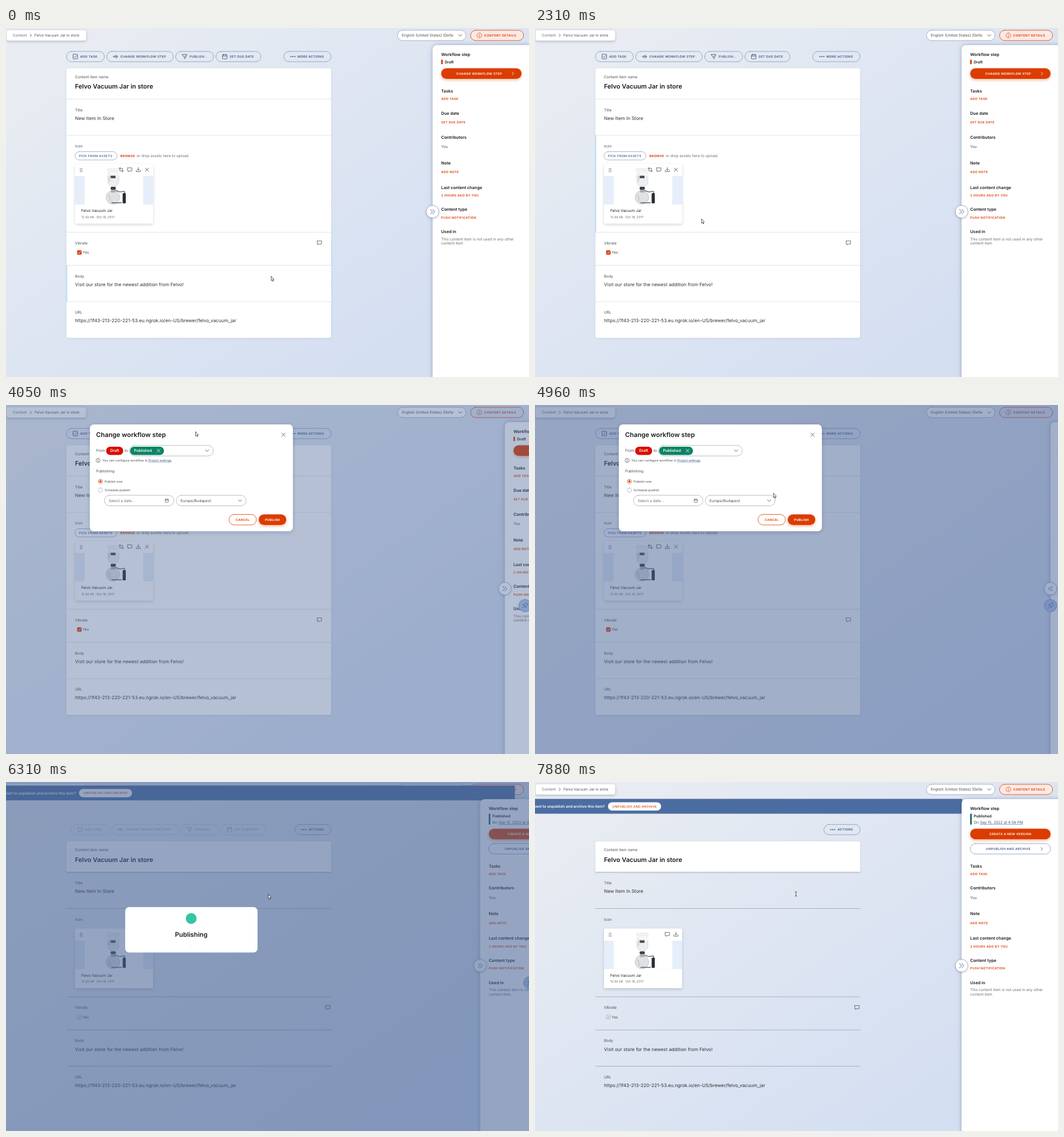
An HTML page with a canvas that plays this animation: 917 by 611 pixels, repeating every 8 s.

```html
<!DOCTYPE html>
<html lang="en">
<head>
<meta charset="utf-8">
<title>Publishing a content item</title>
<style>
html, body { margin: 0; width: 100%; height: 100%; overflow: hidden; background: #dfe7f2; }
canvas { display: block; width: 917px; height: 611px; }
</style>
</head>
<body>
<canvas id="stage"></canvas>
<script>
const W = 917, H = 611, LOOP = 8000;
const INK = '#1a1a1a', GREY = '#4c4c4c', SOFT = '#6c6c6c', ORANGE = '#db3c00', WHITE = '#fff';
const BLUE = '#3f5684', EDGE = '#8093b5';
const ITEM = 'Felvo Vacuum Jar';
const cv = document.getElementById('stage');
const c = cv.getContext('2d');
const dpr = window.devicePixelRatio || 1;
cv.width = W * dpr;
cv.height = H * dpr;

// Value on a keyed track: each key is [time, ...values].
function track(t, keys, ease = p => p * p * (3 - 2 * p)) {
  if (t <= keys[0][0]) return keys[0].slice(1);
  for (let i = 1; i < keys.length; i++) {
    const a = keys[i - 1], b = keys[i];
    if (t < b[0]) {
      const p = ease((t - a[0]) / (b[0] - a[0]));
      return a.slice(1).map((v, k) => v + (b[k + 1] - v) * p);
    }
  }
  return keys[keys.length - 1].slice(1);
}
const linear = p => p;

function text(s, x, y, { size = 6.55, color = INK, weight = 400, gap = 0, align = 'left' } = {}) {
  c.font = `${weight} ${size}px Inter, sans-serif`;
  c.letterSpacing = gap + 'px';
  c.textAlign = align;
  c.fillStyle = color;
  c.fillText(s, x, y + size * 0.364);
}
const label = (s, x, y, color = GREY) => text(s, x, y, { color });
const caps = (s, x, y, color = BLUE, align = 'left', weight = 600) =>
  text(s, x, y, { size: 5.5, weight, gap: 0.33, color, align });
const head = (s, x, y) => text(s, x, y, { size: 7.3, weight: 600 });

function shadow(color, blur, dy = 0) {
  c.shadowColor = color;
  c.shadowBlur = blur * dpr;
  c.shadowOffsetY = dy * dpr;
}
const noShadow = () => shadow('transparent', 0);

function box(x, y, w, h, r, fill, stroke, width = 0.7) {
  c.beginPath();
  c.roundRect(x, y, w, h, r);
  if (fill) { c.fillStyle = fill; c.fill(); }
  noShadow();
  if (stroke) { c.strokeStyle = stroke; c.lineWidth = width; c.stroke(); }
}
function disc(x, y, r, fill, stroke, width = 0.7) {
  box(x - r, y - r, 2 * r, 2 * r, r, fill, stroke, width);
}
function path(pts, stroke, width = 0.8, fill) {
  c.beginPath();
  for (let i = 0; i < pts.length; i += 2) c.lineTo(pts[i], pts[i + 1]);
  if (fill) { c.closePath(); c.fillStyle = fill; c.fill(); }
  if (stroke) { c.strokeStyle = stroke; c.lineWidth = width; c.stroke(); }
}
const at = (x, y, draw) => { c.save(); c.translate(x, y); draw(); c.restore(); };

const icon = {
  check(x, y, col = BLUE) {
    at(x, y, () => { box(-4, -4, 8, 8, 1, null, col, 0.9); path([-2, 0, -0.5, 1.6, 2.6, -2], col, 0.9); });
  },
  step(x, y) {
    at(x, y, () => {
      path([-4.5, 0, 3.8, 0], BLUE, 0.9);
      path([1.2, -2.6, 4, 0, 1.2, 2.6], BLUE, 0.9);
      disc(-0.8, 0, 1.5, '#dfe7f2', BLUE, 0.9);
    });
  },
  funnel(x, y) {
    at(x, y, () => {
      path([-4.3, -3.6, 4.3, -3.6, 0.6, 4, -0.9, 0.7, -4.3, -3.6], BLUE, 0.9);
      path([-0.9, 0.7, 2, -1.6], BLUE, 0.8);
    });
  },
  calendar(x, y, k = 1, col = BLUE) {
    at(x, y, () => {
      c.scale(k, k);
      box(-4, -3.4, 8, 7.4, 1, null, col, 0.9);
      path([-4, -0.9, 4, -0.9], col, 0.9);
      path([-2, -4.4, -2, -2.6], col, 0.9);
      path([2, -4.4, 2, -2.6], col, 0.9);
    });
  },
  dots(x, y) { for (let i = -1; i < 2; i++) disc(x + i * 3.4, y, 1.1, BLUE); },
  comment(x, y) {
    path([x - 3.8, y - 3.2, x + 3.8, y - 3.2, x + 3.8, y + 2.2, x - 0.4, y + 2.2, x - 2, y + 3.8,
      x - 2, y + 2.2, x - 3.8, y + 2.2, x - 3.8, y - 3.2], GREY);
  },
  crop(x, y) {
    path([x - 2.2, y - 4, x - 2.2, y + 2.2, x + 4, y + 2.2], GREY);
    path([x - 4, y - 2.2, x + 2.2, y - 2.2, x + 2.2, y + 4], GREY);
  },
  download(x, y) {
    path([x, y - 4, x, y + 1.2], GREY);
    path([x - 2, y - 0.8, x, y + 1.3, x + 2, y - 0.8], GREY);
    path([x - 3.6, y + 1, x - 3.6, y + 3.4, x + 3.6, y + 3.4, x + 3.6, y + 1], GREY);
  },
  cross(x, y, r = 3, col = GREY) {
    path([x - r, y - r, x + r, y + r], col);
    path([x + r, y - r, x - r, y + r], col);
  },
  right(x, y, col = GREY, r = 2.4) { path([x - r / 2, y - r, x + r / 2, y, x - r / 2, y + r], col, 0.9); },
  down(x, y) { path([x - 2.8, y - 1.3, x, y + 1.4, x + 2.8, y - 1.3], GREY, 0.9); },
  info(x, y, r, col) {
    disc(x, y, r, null, col);
    path([x, y - 0.5, x, y + r * 0.55], col, 0.8);
    disc(x, y - r * 0.45, 0.5, col);
  }
};

function background() {
  const g = c.createLinearGradient(170, 0, 600, 611);
  g.addColorStop(0, '#e8ecf2');
  g.addColorStop(1, '#d4dff2');
  c.fillStyle = g;
  c.fillRect(0, 0, W, H);
}

function topBar(detailsOpen) {
  shadow('rgba(40,50,80,.3)', 5, 1.5);
  box(1, 4, 139.5, 18, 4, WHITE);
  label('Content', 12, 13, SOFT);
  icon.right(43.5, 13, GREY, 2.2);
  text(ITEM + ' in store', 50, 13, { size: 6.45, color: GREY });
  box(686.5, 4, 120, 18, 9, WHITE, '#8e99ad');
  c.save();
  c.beginPath();
  c.rect(690, 4, 94.5, 18);
  c.clip();
  label('English (United States) (Default)', 694, 13);
  c.restore();
  icon.down(796.5, 13);
  box(814.5, 4, 93, 18, 9, detailsOpen && '#fbe9e3', ORANGE, 0.8);
  icon.info(830, 13, 4.2, ORANGE);
  caps('CONTENT DETAILS', 838.5, 13, ORANGE);
}

function tool(x, w, y, s, tx, draw, ix, fill) {
  box(x, y - 9, w, 18, 9, fill, EDGE, 0.8);
  draw(ix, y);
  caps(s, tx, y);
}
function mainTools(dx, y, hover) {
  at(dx, 0, () => {
    tool(106, 66.5, y, 'ADD TASK', 130, icon.check, 121.5);
    tool(176.5, 117, y, 'CHANGE WORKFLOW STEP', 200.5, icon.step, 192);
    tool(297.5, 66.5, y, 'PUBLISH…', 322, icon.funnel, 313, hover && '#b0c5ec');
    tool(368, 79, y, 'SET DUE DATE', 392, icon.calendar, 383.5);
  });
}

// Soft flat silhouette of a glass brewer; x is its left edge, y the top of the picture.
function brewer(x, y) {
  at(x, y, () => {
    box(1, 0, 23, 6, 2.5, '#e2e4e6');
    box(3, 6, 19.5, 26, [2, 2, 8, 8], '#eceef0', '#c6cacf', 0.6);
    box(4.5, 8, 3, 16, 1.5, '#d6d9dd');
    box(8, 13, 8.5, 5, 1, '#45484c');
    box(8, 33, 9, 5, 1.5, '#3c3e42');
    disc(12, 51.5, 12, '#dfe2e5', '#b7bcc1', 0.7);
    box(8.5, 38, 8, 5, 1, '#a9aeb3');
    path([17, 39.5, 24, 42, 32, 41, 33, 44], '#6a6d72', 1.5);
    box(29, 44, 5.5, 18, 1.5, '#2a2c30');
    path([5, 48, 8, 58], '#c8cdd2', 2);
    path([10, 61, 27, 61], '#5c5f64', 1.5);
  });
}

function asset(y, live) {
  shadow('rgba(40,50,80,.2)', 5, 2);
  box(121, y, 137, 104.5, 3, WHITE);
  c.fillStyle = '#e6eef9';
  c.fillRect(121, y + 21, 137, 50);
  c.fillStyle = WHITE;
  c.fillRect(138, y + 20, 102.5, 51);
  c.save();
  c.beginPath();
  c.rect(138, y, 103, 71);
  c.clip();
  brewer(175.5, y + 7);
  c.restore();
  c.fillStyle = 'rgba(255,255,255,.55)';
  c.fillRect(121, y + 4, 137, 17);
  for (let i = 0; i < 6; i++) disc(130.4 + (i % 2) * 2.6, y + 8.2 + (i >> 1) * 2.6, 0.75, GREY);
  if (live) {
    icon.comment(232, y + 10);
    icon.download(247, y + 10);
  } else {
    icon.crop(202, y + 10);
    icon.comment(217, y + 10);
    icon.download(232, y + 10);
    icon.cross(247, y + 10);
  }
  text(ITEM, 132, y + 82, { size: 6.5 });
  text('12.92 kB · Oct 18, 2017', 132, y + 92.8, { size: 5.5, color: SOFT });
}

function form(live, cursorY) {
  const a = live ? 33.5 : 0, b = live ? 18.6 : 0;
  const edges = [71, 124.5 + a, 188 + a, 357.5 + b, 415.5 + b, 479 + b, 542];
  shadow('rgba(60,80,120,.12)', 4, 1);
  if (live) box(106, 104, 464, 53.5, [4, 4, 0, 0], WHITE);
  else box(106, 70.5, 464, 472, 4, WHITE);
  for (const y of edges.slice(1, -1)) path([106, y, 570, y], live ? '#a3abb8' : '#dadde3', live ? 0.9 : 0.8);
  if (cursorY) {
    const i = edges.findIndex((y, k) => cursorY >= y && cursorY < edges[k + 1]);
    if (i >= 0) {
      c.fillStyle = '#aadcf5';
      c.fillRect(106, edges[i], 1.3, edges[i + 1] - edges[i]);
    }
  }
  const body = { size: 8.2, color: '#303030' };
  label('Content item name', 121, 85.5 + a);
  text(ITEM + ' in store', 121, 102 + a, { size: 11, weight: 600 });
  label('Title', 121, 143.5 + a);
  text('New Item In Store', 121, 158 + a, body);
  label('Icon', 121, 207 + a);
  if (!live) {
    box(121, 216.5, 73.5, 14.5, 7.2, null, EDGE);
    caps('PICK FROM ASSETS', 128, 223.5, BLUE, 'left', 500);
    caps('BROWSE', 200.5, 223.7, ORANGE, 'left', 700);
    label('or drop assets here to upload.', 229, 223.7, SOFT);
  }
  asset(238 + b, live);
  label('Vibrate', 121, 376.3 + b);
  icon.comment(live ? 564.5 : 549.5, 376 + b);
  const y = 393 + b;
  box(125, y - 3.6, 7.2, 7.2, 1.5, live ? '#e3e7ed' : ORANGE, live ? '#a8adb5' : ORANGE);
  path([126.7, y, 128.2, y + 1.6, 130.7, y - 1.6], live ? '#8a9099' : WHITE, 0.9);
  label('Yes', 134.2, y);
  label('Body', 121, 434.5 + b);
  text('Visit our store for the newest addition from Felvo!', 121, 449 + b, body);
  label('URL', 121, 498 + b);
  text('https://1f43-213-220-221-53.eu.ngrok.io/en-US/brewer/felvo_vacuum_jar', 121, 512.5 + b, body);
}

function primary(x, y, w, h, fill = ORANGE) {
  shadow('rgba(219,60,0,.4)', 5, 2);
  box(x, y, w, h, h / 2, fill);
}

function sidebar(off, live, flipped) {
  at(off, 0, () => {
    shadow('rgba(40,60,110,.35)', 9);
    box(748, 30, 190, 600, [8, 0, 0, 0], WHITE);
    head('Workflow step', 763, 46.5);
    if (live) {
      c.fillStyle = '#17675c';
      c.fillRect(763, 55.5, 2.8, 19);
      text('Published', 769.3, 59.5, { weight: 600 });
      label('On', 769.3, 70.8);
      label('Sep 15, 2022 at 4:56 PM', 780, 70.8, BLUE);
      path([780, 74.3, 855, 74.3], BLUE, 0.6);
      primary(763, 81.7, 141, 18.5);
      caps('CREATE A NEW VERSION', 833.5, 91, WHITE, 'center');
      box(763, 107.8, 141, 18.3, 9.1, WHITE, EDGE, 0.8);
      caps('UNPUBLISH AND ARCHIVE', 829.7, 117, BLUE, 'center');
      icon.right(888.5, 117, BLUE);
    } else {
      box(763, 55.5, 2.8, 7.8, 0.6, ORANGE);
      text('Draft', 769.3, 59.5, { weight: 600 });
      primary(763, 70.5, 141, 18.5);
      caps('CHANGE WORKFLOW STEP', 829.7, 79.8, WHITE, 'center');
      icon.right(889, 79.8, WHITE);
      head('Due date', 763, 149);
      caps('SET DUE DATE', 763, 165, ORANGE);
    }
    const p = live ? 37 : 0, q = live ? -5.5 : 0;
    head('Tasks', 763, 110 + p);
    caps('ADD TASK', 763, 124 + p, ORANGE);
    head('Contributors', 763, 191.3 + q);
    label('You', 763, 208 + q);
    head('Note', 763, 236 + q);
    caps('ADD NOTE', 763, 252 + q, ORANGE);
    head('Last content change', 763, 279 + q);
    caps('2 HOURS AGO BY YOU', 763, 293 + q, ORANGE);
    head('Content type', 763, 317.7 + q);
    caps('PUSH NOTIFICATION', 763, 331.5 + q, ORANGE);
    head('Used in', 763, 356.5 + q);
    label('This content item is not used in any other', 763, 369.5 + q, SOFT);
    label('content item.', 763, 377 + q, SOFT);
    shadow('rgba(40,60,110,.3)', 4, 1);
    disc(748, 321.5, 11, WHITE, '#8e9ebd');
    const d = flipped ? -1 : 1;
    for (const k of [-2, 2]) path([748 + d * (k - 1.8), 317.5, 748 + d * (k + 1.8), 321.5, 748 + d * (k - 1.8), 325.5], BLUE, 0.9);
  });
  if (off > 0) at(904 + 0.2 * (156 - off), 351.3, () => {
    disc(0, 0, 11, '#b0c5ec', '#6f86b4');
    c.rotate(Math.PI / 4);
    path([-2, -5, 2, -5, 2, -0.8, 3.8, 1.2, -3.8, 1.2, -2, -0.8, -2, -5], BLUE, 0.8);
    path([0, 1.2, 0, 6], BLUE, 0.8);
  });
}

function banner(y, right) {
  c.fillStyle = '#4c6da1';
  c.fillRect(0, y, right, 26);
  text('Do you want to unpublish and archive this item?', 122.5, y + 13, { weight: 600, color: WHITE, align: 'right', size: 6.5 });
  box(128, y + 6, 93, 14.5, 7.2, WHITE);
  caps('UNPUBLISH AND ARCHIVE', 174.7, y + 13.1, ORANGE, 'center', 500);
}

function stepDialog(pressed) {
  shadow('rgba(20,35,80,.2)', 8, 2);
  box(147, 34, 356, 187, 7, WHITE);
  text('Change workflow step', 158, 52, { size: 11.25, weight: 600 });
  icon.cross(486.5, 52, 3.2);
  label('From', 158, 80);
  box(216, 70.8, 147.5, 18.4, 9.2, WHITE, '#9a9fa8');
  box(175.5, 73, 30, 14.5, 7.2, '#dc0d00');
  text('Draft', 190.5, 80, { weight: 600, color: WHITE, align: 'center' });
  label('to', 208, 80);
  box(217.5, 73, 59.5, 14.5, 7.2, '#0b8465');
  text('Published', 224.5, 80, { weight: 600, color: WHITE });
  icon.cross(267.5, 80, 2.8, WHITE);
  icon.down(352.5, 80);
  icon.info(161.5, 97, 3.6, GREY);
  const note = { size: 5.5, color: GREY };
  text('You can configure workflow in ', 169, 97, note);
  const x = 169 + c.measureText('You can configure workflow in ').width;
  text('Project settings', x, 97, { size: 5.5, color: BLUE });
  const w = c.measureText('Project settings').width;
  path([x, 100, x + w, 100], BLUE, 0.5);
  text('.', x + w, 97, note);
  label('Publishing', 158, 115.3);
  disc(165.5, 133.8, 3.7, WHITE, ORANGE);
  disc(165.5, 133.8, 2, ORANGE);
  disc(165.5, 149, 3.7, WHITE, '#9a9fa8');
  text('Publish now', 173, 133.8, note);
  text('Schedule publish', 173, 149, note);
  box(172.5, 158, 122, 18.5, 9.2, WHITE, '#9a9fa8');
  label('Select a date…', 180, 167.3, SOFT);
  icon.calendar(282, 167.5, 0.72, GREY);
  box(298.5, 158, 122.5, 18.5, 9.2, WHITE, '#9a9fa8');
  label('Europe/Budapest', 306, 167.3);
  icon.down(410.5, 167.3);
  box(391, 191.5, 48, 18.5, 9.2, WHITE, ORANGE, 0.8);
  caps('CANCEL', 415, 200.8, ORANGE, 'center');
  primary(443, 191.5, 48.5, 18.5, pressed ? '#b63200' : ORANGE);
  caps('PUBLISH', 467.3, 200.8, WHITE, 'center', 700);
}

function progressDialog(t) {
  box(209, 219, 232, 79.5, 7, WHITE);
  disc(324.7, 239, 9.5, '#35c5a4');
  text('Publishing', 324.8, 267, { size: 11.25, weight: 600, align: 'center' });
  if (t >= 5880) text('.', 324.8, 285, { size: 6.5, color: SOFT, align: 'center' });
}

const cursorKeys = [
  [80, 465, 435], [420, 330, 325], [810, 225, 385], [890, 225, 385], [1400, 150, 505], [1570, 150, 505],
  [2310, 292, 334.5], [2390, 292, 334.5], [2970, 332.5, 47], [4150, 332.5, 47], [4460, 340, 75],
  [5290, 460, 197], [6700, 460, 197], [6890, 457, 197], [7799, 457, 197], [7800, 458, 199], [7880, 457.5, 196]
];

function cursor(x, y, kind) {
  at(x, y, () => {
    if (kind === 'text') {
      for (const [col, w] of [[WHITE, 1.6], ['#222', 0.8]]) {
        path([0, -3.5, 0, 3.5], col, w);
        path([-1.8, -4, 0, -3.4, 1.8, -4], col, w);
        path([-1.8, 4, 0, 3.4, 1.8, 4], col, w);
      }
    } else if (kind === 'hand') {
      path([0.2, 0.6, 1.2, 0.6, 1.5, 4, 4.6, 4.6, 4.8, 7.4, 3.8, 10, 0.4, 10, -1.8, 6.6, -1.2, 5.8, 0.2, 7, 0.2, 0.4],
        '#222', 0.8, WHITE);
    } else {
      c.scale(0.92, 0.92);
      path([0, 0, 0, 8, 1.8, 6.4, 3.1, 9.2, 4.3, 8.7, 3.1, 5.9, 5.4, 5.7, 0, 0], '#222', 0.8, WHITE);
    }
  });
}

function draw(t) {
  const live = t >= 6220;
  const [x, y] = track(t, cursorKeys);
  const onTool = t < 3850 && y > 41 && y < 59 && x > 297 && x < 364;
  const onPublish = t > 4200 && t < 5640 && x > 443 && y > 191;
  const [off] = live
    ? track(t, [[6220, 156], [6310, 84], [6420, 22], [6560, 0]], linear)
    : track(t, [[3850, 0], [3960, 76], [4050, 126.5], [4160, 149], [4280, 156]], linear);

  c.setTransform(dpr, 0, 0, dpr, 0, 0);
  c.textBaseline = 'alphabetic';
  c.textRendering = 'geometricPrecision';
  c.lineJoin = c.lineCap = 'round';
  noShadow();
  background();
  form(live, t < 3850 && y);
  if (live) {
    const [fade] = track(t, [[6220, 0.5], [6310, 0.4], [6620, 0]], linear);
    if (fade > 0) {
      c.globalAlpha = fade;
      mainTools(8.5, 83.3, false);
      c.globalAlpha = 1;
    }
    tool(506.5, 63.5, 83.3, 'ACTIONS', 530.5, icon.dots, 522);
  } else {
    mainTools(0, 50, onTool);
    tool(487, 83, 50, 'MORE ACTIONS', 511, icon.dots, 503);
  }
  topBar(live || t < 3850);
  if (live) banner(...track(t, [[6220, -18, 917], [6310, 6, 893], [6420, 22, 800], [6560, 29.5, 749]], linear));
  sidebar(off, live, !live && t >= 4700);

  const [dim] = t < 5640
    ? track(t, [[3820, 0], [4050, 0.4], [4400, 0.5]], linear)
    : track(t, [[5640, 0.46], [5710, 0.5], [5960, 0.57], [6560, 0.57], [6890, 0]], linear);
  c.fillStyle = `rgba(70,97,147,${dim})`;
  c.fillRect(0, 0, W, H);

  if (t >= 3850 && t < 5640) {
    c.globalAlpha = Math.min(1, (t - 3850) / 150);
    stepDialog(onPublish && t >= 5380);
    c.globalAlpha = 1;
  } else if (t >= 5640 && t < 6640) {
    progressDialog(t);
  }
  cursor(x, y, t >= 7800 ? 'text' : onTool || onPublish ? 'hand' : 'arrow');
}

function frame() {
  draw(performance.now() % LOOP);
  requestAnimationFrame(frame);
}
frame();
</script>
</body>
</html>
```
